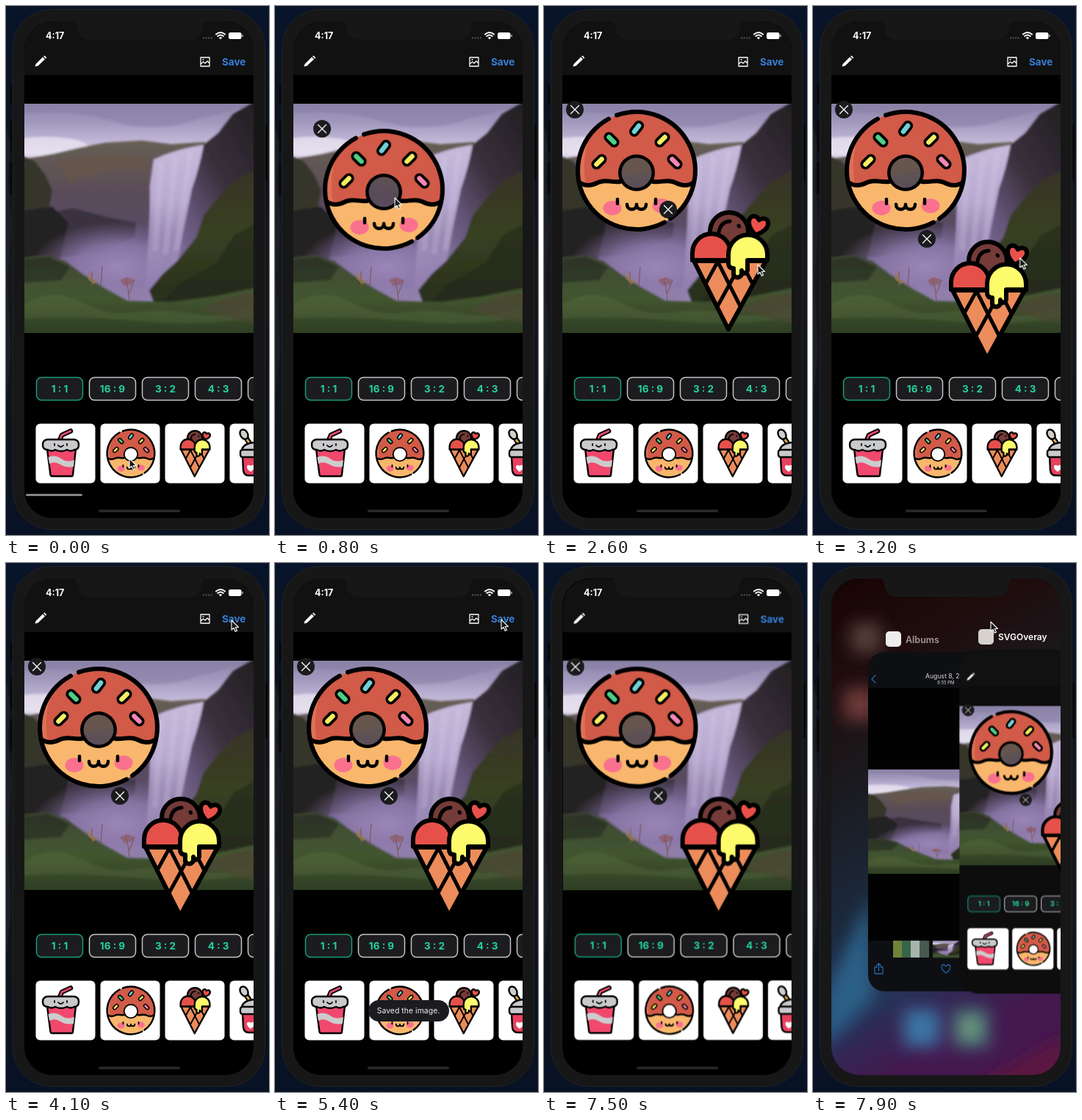
Recreate the animation shown at these times as an HTML page. Size 358 px wide and 720 px high, loop 8 s.

```html
<!DOCTYPE html>
<html lang="en">
<head>
<meta charset="utf-8">
<title>Sticker editor</title>
<style>
html, body { margin: 0; width: 100%; height: 100%; overflow: hidden; background: #0a0e18; }
svg { display: block; width: 358px; height: 720px; font-family: Inter, Roboto, sans-serif; }
.ink { stroke: #000; stroke-width: 6; stroke-linecap: round; stroke-linejoin: round; }
.line { fill: none; }
.thin { stroke-width: 2.4; }
.icon { fill: none; stroke: #fff; stroke-width: 1.3; stroke-linecap: round; stroke-linejoin: round; }
.blue { stroke: #2567b0; }
</style>
</head>
<body>
<svg viewBox="0 0 358 720">
<defs>
  <linearGradient id="desk" x2="0" y2="1">
    <stop offset="0" stop-color="#08142a"/><stop offset=".2" stop-color="#0b131f"/>
    <stop offset=".5" stop-color="#15181c"/><stop offset=".8" stop-color="#0d131c"/>
    <stop offset="1" stop-color="#081226"/>
  </linearGradient>
  <linearGradient id="sky" x2="0" y2="1">
    <stop offset="0" stop-color="#8f87ab"/><stop offset=".08" stop-color="#a198bd"/>
    <stop offset=".17" stop-color="#c3bad9"/><stop offset=".25" stop-color="#ddd5ea"/>
    <stop offset="1" stop-color="#8a78a4"/>
  </linearGradient>
  <linearGradient id="hill" x2="0" y2="1">
    <stop offset="0" stop-color="#665f53"/><stop offset=".35" stop-color="#5a4c58"/>
    <stop offset=".7" stop-color="#584a69"/><stop offset="1" stop-color="#85739f"/>
  </linearGradient>
  <linearGradient id="fall" x2="0" y2="1">
    <stop offset="0" stop-color="#c6bbdb"/><stop offset=".4" stop-color="#b7a8d0"/>
    <stop offset="1" stop-color="#9885b6" stop-opacity=".5"/>
  </linearGradient>
  <linearGradient id="rock" x1="1" x2=".1" y2="1">
    <stop offset="0" stop-color="#201d20"/><stop offset=".4" stop-color="#3a303c"/>
    <stop offset=".65" stop-color="#66567a"/><stop offset="1" stop-color="#8f7dac"/>
  </linearGradient>
  <linearGradient id="slope" x2="0" y2="1">
    <stop offset="0" stop-color="#363326"/><stop offset=".45" stop-color="#384022"/>
    <stop offset="1" stop-color="#252c1a"/>
  </linearGradient>
  <linearGradient id="grass" x2="0" y2="1">
    <stop offset="0" stop-color="#414a36"/><stop offset=".5" stop-color="#42552f"/>
    <stop offset="1" stop-color="#2b3b22"/>
  </linearGradient>
  <radialGradient id="mist">
    <stop offset="0" stop-color="#9a87b8"/><stop offset=".5" stop-color="#8c79aa" stop-opacity=".85"/>
    <stop offset="1" stop-color="#7d6b98" stop-opacity="0"/>
  </radialGradient>
  <linearGradient id="wall" x2=".25" y2="1">
    <stop offset="0" stop-color="#180405"/><stop offset=".2" stop-color="#1f0c0d"/>
    <stop offset=".42" stop-color="#1a1b20"/><stop offset=".68" stop-color="#1c2a3f"/>
    <stop offset=".85" stop-color="#263258"/><stop offset="1" stop-color="#43194f"/>
  </linearGradient>
  <filter id="soft" x="-5%" y="-5%" width="110%" height="110%"><feGaussianBlur stdDeviation="1.8"/></filter>
  <filter id="blur" x="-100%" y="-100%" width="300%" height="300%"><feGaussianBlur stdDeviation="11"/></filter>
  <clipPath id="screen"><rect x="25" y="21" width="312" height="676" rx="38"/></clipPath>
  <clipPath id="square"><rect width="312" height="312"/></clipPath>
  <clipPath id="disc"><circle r="80"/></clipPath>
  <clipPath id="wafer"><path d="M-49-13H49L-2 80Z"/></clipPath>
  <clipPath id="sheet"><rect x="75" y="121" width="215" height="462" rx="22"/></clipPath>
  <mask id="ring"><rect x="-90" y="-90" width="180" height="180" fill="#fff"/><circle cy="3" r="20.5" fill="#000"/></mask>

  <g id="photo" clip-path="url(#square)">
    <rect width="312" height="312" fill="url(#sky)"/>
    <g filter="url(#soft)">
      <path d="M-5 14Q60 6 120 24T240 20L320 0V-9H-5Z" fill="#857da3" opacity=".5"/>
      <ellipse cx="28" cy="58" rx="58" ry="13" fill="#ebe6f2" opacity=".75"/>
      <path d="M-5 76L40 68 74 60 110 53 160 50 200 55 246 52V250H-5Z" fill="url(#hill)"/>
      <path d="M44 78Q100 62 168 72L166 92Q110 84 60 110Z" fill="#6a5748" opacity=".55"/>
      <path d="M20 152L66 142 112 154 152 162 150 182 96 204 20 212Z" fill="#2e2832" opacity=".7"/>
      <path d="M-5 70L14 78 28 96 38 118 34 140 48 158 42 210-5 214Z" fill="#34342a"/>
      <path d="M-5 146L38 140 60 162 48 214-5 216Z" fill="#242122"/>
      <path d="M318-6L284 14 264 40 244 56 222 110 200 214 172 256 260 200 318 120Z" fill="url(#rock)"/>
      <ellipse cx="128" cy="222" rx="120" ry="62" fill="url(#mist)"/>
      <path d="M176 76Q205 62 244 56 238 88 228 116 218 165 208 218L190 250H164Q172 160 171 112Z" fill="url(#fall)"/>
      <path d="M186 80L178 200M206 72L192 205M226 66L207 200" stroke="#dcd2ec" stroke-width="8" fill="none" opacity=".2"/>
      <path d="M318 88L284 106 262 130 244 152 234 182 208 214 188 232 170 254 178 275 318 284Z" fill="url(#slope)"/>
      <path d="M318 162L286 178 262 216 212 244 188 268 318 268Z" fill="#242a1b" opacity=".7"/>
      <path d="M-5 210L30 206 56 214 80 232 108 250 140 268 200 270 260 262 318 250V320H-5Z" fill="url(#grass)"/>
      <path d="M-5 212L32 208 62 222 50 240-5 244Z" fill="#283122" opacity=".8"/>
      <path d="M0 272Q40 250 78 270T150 284 230 286 318 272V290Q240 304 160 296T0 292Z" fill="#5c7040" opacity=".35"/>
      <path d="M240 282Q280 256 318 258V300Z" fill="#4c4632" opacity=".7"/>
    </g>
    <path d="M143 268Q142 252 138 238M143 258L150 240M92 250V228M104 248L106 222" stroke="#7b4f50" fill="none"/>
    <path d="M130 240L140 236 150 240 146 246 136 248Z" fill="#8d5358" opacity=".6"/>
    <path d="M88 227L92 238 100 242 94 246 86 238Z" fill="#9c7b4c" opacity=".7"/>
  </g>

  <g id="donut">
    <g clip-path="url(#disc)">
      <circle r="80" fill="#f8b76c"/>
      <path d="M-85-85H85V14C72 22 62 21 52 16S34 17 22 15H-22C-34 17-42 11-52 16S-72 22-85 14Z" fill="#d15a48"/>
      <path d="M-48-70C-80-40-80 40-40 72L-90 60V-60Z" fill="#ffab78" opacity=".28"/>
      <path class="ink line" d="M-79 15C-70 22-62 21-52 16S-34 17-22 15M79 15C70 22 62 21 52 16S34 17 22 15"/>
    </g>
    <circle cy="3" r="25" fill="#000"/>
    <ellipse cx="-33" cy="51" rx="12.5" ry="10" fill="#fa718f"/>
    <ellipse cx="34" cy="48" rx="12.5" ry="10" fill="#fa718f"/>
    <path class="ink line" style="stroke-width:4.5" d="M-26 39V45M26 39V45M-13 46C-13 55 0 55 0 46 0 55 13 55 13 46"/>
    <path class="ink line" d="M-27-75.300A80 80 0 0 1 46 65.400M38 70.400A80 80 0 0 1-38-70.400"/>
    <g id="sprinkles"></g>
  </g>

  <g id="cone">
    <circle class="ink" cx="-1" cy="-53" r="26" fill="#743b38"/>
    <path class="ink line" d="M-15-52Q-13-66 0-67M12-61L12.5-60" style="stroke-width:5"/>
    <path class="ink" transform="translate(38 -61) rotate(14)" d="M0 13C-24-2-10-19 0-8 10-19 24-2 0 13Z" fill="#e9514a"/>
    <path class="ink" d="M-49-13H49L-2 80Z" fill="#ed8c5b"/>
    <g clip-path="url(#wafer)"><path class="ink line" style="stroke-width:5" d="M-17-13L30 80M15-13L62 80M17-13L-34 80M-16-13L-67 80"/></g>
    <path class="ink" d="M-51-14V-24A26 26 0 0 1 1-24V-14Z" fill="#e5514a"/>
    <path class="ink" d="M-2-22A26.500 26.500 0 0 1 51-22V-14H24V0Q20 8 16 0V6Q10 13 5 6V-3Q-2-3-2-10Z" fill="#fdfb6c"/>
  </g>

  <g id="close">
    <circle r="12" fill="#1b1b1d"/>
    <path class="icon" d="M-5.500-5.500L5.500 5.500M5.500-5.500L-5.500 5.500"/>
  </g>
</defs>

<rect width="358" height="720" fill="url(#desk)"/>
<path d="M0 160L6 190 3 240 8 300 2 370 7 470 0 540Z" fill="#202329" opacity=".7"/>
<path d="M7 108V134M7 156V200M7 212V256M354.500 162V238" stroke="#08090b" stroke-width="3"/>
<rect x="9.500" y="4.500" width="343" height="708" rx="52" fill="#171718" stroke="#222225"/>

<g clip-path="url(#screen)">
  <rect x="25" y="21" width="312" height="676"/>
  <g id="switcher">
    <rect x="25" y="21" width="312" height="676" fill="url(#wall)"/>
    <g filter="url(#blur)">
      <path d="M15 590L78 455 84 590 15 660Z" fill="#2a5f86"/>
      <rect x="52" y="82" width="40" height="40" fill="#54403a"/>
      <rect x="42" y="170" width="44" height="44" fill="#6e3939"/>
      <path d="M190 730L345 640V730Z" fill="#5b1440"/>
      <rect x="124" y="608" width="48" height="50" fill="#3a76a6"/>
      <rect x="192" y="608" width="46" height="50" fill="#47867f"/>
      <circle cx="214" cy="633" r="10" fill="#8a9a72"/>
    </g>
    <g id="album">
      <g clip-path="url(#sheet)">
        <rect x="75" y="121" width="215" height="462" fill="#020203"/>
        <path d="M75 121H290V170H75ZM75 514H290V583H75Z" fill="#0e0f12"/>
        <use href="#photo" transform="translate(75 281) scale(.66 .455)"/>
        <g transform="translate(109 514)">
          <rect width="12" height="23" fill="#71823a"/><rect x="12" width="12" height="23" fill="#37654a"/>
          <rect x="24" width="12" height="23" fill="#a7b4ad"/><rect x="36" width="13" height="23" fill="#495a50"/>
          <use href="#photo" transform="translate(54 0) scale(.12 .074)"/>
        </g>
        <path class="icon blue" d="M85 153L80 158 85 163"/>
        <path class="icon blue" d="M87 550H84V559H95V550H92M89.500 555V545L86.500 548M89.500 545L92.500 548M181 558C170 550 177 543 181 549 185 543 192 550 181 558Z"/>
        <g fill="#dadada"><text x="153" y="157" font-size="8.600">August 8, 2020</text><text x="169" y="165" font-size="6">9:55 PM</text></g>
      </g>
      <rect x="99" y="93" width="21" height="21" rx="5" fill="#eeeeec"/>
      <text x="126" y="109" font-size="12.500" font-weight="600" fill="#a39897">Albums</text>
    </g>
    <g id="label">
      <rect x="225" y="90" width="21" height="21" rx="5" fill="#d6d2ce"/>
      <text x="252" y="105" font-size="12" font-weight="600" fill="#fff">SVGOveray</text>
    </g>
  </g>

  <g id="app"><g clip-path="url(#screen)">
    <rect id="page" x="25" y="21" width="312" height="676"/>
    <rect x="25" y="21" width="312" height="73" fill="#111112"/>
    <path d="M39.500 82.500L40.500 79 50 69.500 53 72.500 43.500 81.500ZM51 68.500L52.500 67.500 55.300 70.300 54 71.700Z" fill="#fff"/>
    <path class="icon" d="M265 70H277V82H265ZM265 79L268.500 76 271 78 274 75 277 78M268 73H269"/>
    <text x="294" y="81" font-size="13.500" font-weight="700" fill="#3680d8">Save</text>
    <use href="#photo" x="25" y="133"/>
    <g id="chips"></g>
    <g id="cards" fill="#fff"></g>
    <g class="ink thin">
      <path d="M73 591L76 584 88 578.500" fill="none" stroke-width="6.500"/>
      <path d="M73 591L76 584 88 578.500" fill="none" stroke="#ee4b70" stroke-width="2.600"/>
      <path d="M56 603H95L91 638Q91 640 89 640H63Q61 640 60.500 638Z" fill="#f1486d"/>
      <path d="M57.500 614Q67 610 75 616T93 618L92 627Q82 629 74 624T59 623Z" fill="#ccc" stroke="none"/>
      <path d="M56 590H93Q99 591 99 597 99 604 93 604 88 607 83 604 75 608 67 604 62 607 57 604 50 604 50 597 50 591 56 590Z" fill="#c9cacc"/>
      <path class="line" stroke-width="1.800" d="M66 596V598M83 596V598M71 598Q74.500 602 78 598"/>
    </g>
    <use href="#donut" mask="url(#ring)" transform="translate(170 609) scale(.405)"/>
    <use href="#cone" transform="translate(257.500 609) scale(.39)"/>
    <g class="ink thin">
      <path d="M323 582L336 602" stroke-width="7"/>
      <path d="M324 584L336 602" stroke="#dca94e" stroke-width="3"/>
      <ellipse cx="324" cy="583" rx="5" ry="7" fill="#d0cdca" transform="rotate(-30 324 583)"/>
      <path d="M321 606Q321 595 340 594V606Z" fill="#c9cacc"/>
      <path d="M322 613H350V639H330Q324 639 323 632Z" fill="#e8405f"/>
      <rect x="319" y="604" width="40" height="10" rx="3" fill="#c9cacc"/>
      <path d="M333 634C324 628 329 622 333 626 337 622 342 628 333 634Z" fill="#fff" stroke="none"/>
    </g>
    <rect id="bar" x="27" y="664" width="77" height="3" rx="1.500" fill="#858585"/>
    <g id="s1"><use href="#donut" mask="url(#ring)"/><use href="#close" x="-84" y="-83"/></g>
    <g id="s2"><use href="#cone"/><use href="#close" x="-84" y="-83"/></g>
    <g id="toast">
      <rect x="127" y="595" width="110" height="29" rx="14.500" fill="#1b1b20"/>
      <text x="181.500" y="613" font-size="10.500" fill="#f0f0f0" text-anchor="middle">Saved the image.</text>
    </g>
  </g></g>

  <g id="status">
    <text x="54" y="45" font-size="12.500" font-weight="700" fill="#fff">4:17</text>
    <path d="M268 43.500H281" stroke="#555" stroke-width="2" stroke-dasharray="2 1.600"/>
    <path d="M286 38.500Q292 33.500 298 38.500M288.300 41Q292 38 295.700 41" class="icon" style="stroke-width:2"/>
    <path d="M292 45.500L289.700 43Q292 41.500 294.300 43Z" fill="#fff"/>
    <rect x="303" y="36" width="17.500" height="9" rx="2.500" fill="#fff"/><path d="M322 39V42" stroke="#aaa" stroke-width="1.500"/>
    <rect x="126" y="685.500" width="111" height="3.500" rx="1.700" fill="#29292b"/>
  </g>
</g>
<path d="M89 20Q97 21 97 28 98 46 116 46H248Q266 46 267 28 267 21 275 20Z" fill="#171718"/>
<path id="cursor" d="M0 0V13L3 10.300 5.200 15.300 7.500 14.300 5.300 9.500H9.500Z" fill="#161616" stroke="#fff" stroke-width="1.100" stroke-linejoin="round"/>
</svg>

<script>
const LOOP = 8000;
const el = id => document.getElementById(id);

// x, y, tilt, colour
const sprinkles = [
  [-51, -12, -45, '#f7ee62'], [-34, -42, 45, '#4fcf84'], [0, -57, -52, '#74cfd6'],
  [35, -42, -45, '#f7ee62'], [52, -12, 45, '#f587b4']
];
el('sprinkles').innerHTML = sprinkles.map(([x, y, a, c]) =>
  `<g transform="translate(${x} ${y}) rotate(${a})" stroke-linecap="round">
    <path d="M-5 0H5" stroke="#000" stroke-width="14"/><path d="M-5 0H5" stroke="${c}" stroke-width="6.5"/></g>`).join('');

el('chips').innerHTML = ['1 : 1', '16 : 9', '3 : 2', '4 : 3', ''].map((ratio, i) =>
  `<rect x="${41.5 + 72 * i}" y="505.5" width="63" height="31" rx="7" fill="#1c1c1f"
    stroke="${i ? '#c4c4c6' : '#199c78'}" stroke-width="1.5"/>
  <text x="${73 + 72 * i}" y="526" font-size="13.5" font-weight="700" fill="#25d39a"
    text-anchor="middle">${ratio}</text>`).join('');

el('cards').innerHTML = [0, 1, 2, 3].map(i =>
  `<rect x="${40.5 + 88 * i}" y="568.5" width="81" height="81" rx="6"/>`).join('');

function play(id, steps, easing = 'ease-in-out') {
  const frames = steps.map(([t, props]) => ({ offset: t / LOOP, easing, ...props }));
  frames.unshift({ ...frames[0], offset: 0 });
  frames.push({ ...frames[frames.length - 1], offset: 1 });
  el(id).animate(frames, { duration: LOOP, iterations: Infinity });
}
const at = (x, y, s = 1) => ({ transform: `translate(${x}px, ${y}px) scale(${s})` });
const move = (id, steps, easing) => play(id, steps.map(([t, ...p]) => [t, at(...p)]), easing);
const fade = (id, steps) => play(id, steps.map(([t, opacity]) => [t, { opacity }]));

// A sticker shows at once when its card is tapped, then gets dragged.
function sticker(id, tap, steps) {
  move(id, steps);
  fade(id, [[tap, 0], [tap, 1]]);
}

sticker('s1', 200, [[550, 181, 289], [1000, 126, 224]]);
sticker('s2', 1800, [[2150, 181, 289], [2600, 253, 360], [3050, 239, 400]]);

move('cursor', [
  [150, 168, 616], [550, 196, 300], [1000, 141, 235], [1600, 270, 592], [1750, 270, 592],
  [2150, 219, 281], [2600, 291, 352], [3050, 277, 392], [3600, 307, 78], [4600, 307, 78],
  [4700, 308, 77], [6750, 308, 77], [7100, 330, -25], [7500, 225, -25], [7900, 242, 80]
]);

fade('bar', [[300, 1], [600, 0]]);
fade('toast', [[4600, 0], [4800, 1], [6500, 1], [6700, 0]]);
fade('status', [[7500, 1], [7650, 0]]);
fade('switcher', [[7500, 0], [7700, 1]]);
fade('label', [[7600, 0], [7850, 1]]);
play('page', [[7500, { fill: '#000' }], [7900, { fill: '#0d0d0e' }]]);
move('app', [[7500, 0, 0], [7900, 182, 102.4, .694]], 'ease-out');
move('album', [[7500, -140, 0], [7900, 0, 0]], 'ease-out');
</script>
</body>
</html>
```
